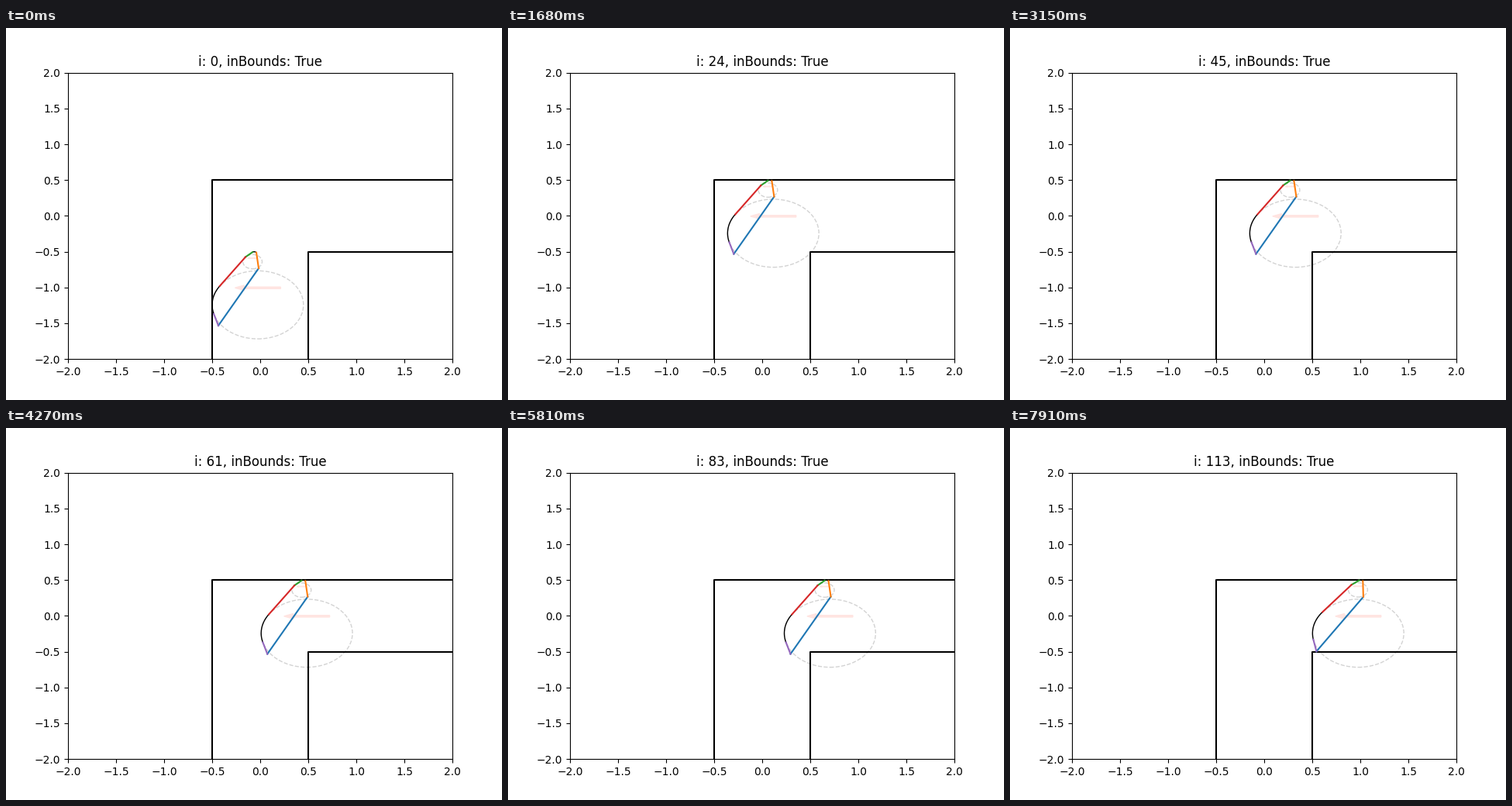
A matplotlib script that plays this animation: 640x480 px, repeating every 7980 ms.

```python
import numpy as np
import matplotlib.pyplot as plt
from matplotlib.animation import FuncAnimation
from matplotlib.patches import Circle, Polygon

FRAMES, STEP_MS = 114, 70
BIG_R, SMALL_R = 0.475, 0.1
LIFT_END, TURN_START, TURN_END, LAST = 10, 101, 108, 113

# Shape vertices, relative to the centre of the large circle
SMALL = np.array([-0.055, 0.6025])
FOOT = (-0.4105, -0.29)
ELBOW = (0.009, 0.5105)
CAP_R = (-0.015, 0.73)
CAP_L = (-0.055, 0.7355)
SHOULDER = (-0.128, 0.668)


def on_big(deg):
    a = np.radians(deg)
    return np.stack([BIG_R * np.cos(a), BIG_R * np.sin(a)], axis=-1)


def bezier(p, q, r, n=12):
    t = np.linspace(0, 1, n)[:, None]
    p, q, r = map(np.array, (p, q, r))
    return (1 - t) ** 2 * p + 2 * t * (1 - t) * q + t ** 2 * r


BACK, HEEL = on_big(146.4), on_big(195.5)
EDGES = [np.array(e) for e in (
    (FOOT, ELBOW), (ELBOW, CAP_R), (CAP_L, SHOULDER),
    (SHOULDER, BACK), (HEEL, FOOT))]
ARCS = [on_big(np.linspace(146.4, 195.5, 40)),
        bezier(CAP_L, (-0.035, 0.75), CAP_R)]

# Unit arrow pointing left, scaled by the radius of its circle
ARROW = np.array([(0.5, 0.55), (0.5, 0.45), (-0.3, 0.45 ), (-0.3, 0.35),
                  (-0.5, 0.5), (-0.3, 0.65), (-0.3, 0.55)])
ARROW[:, 1] = 0.5 + (ARROW[:, 1] - 0.5) * 0.5 * np.where(
    np.abs(ARROW[:, 1] - 0.5) > 0.1, 1.0, 1.0)


def pose(i):
    """Centre of the large circle and the turn angle in radians."""
    x = np.interp(i, [0, LIFT_END, TURN_START, TURN_END, LAST],
                  [-0.025, -0.025, 0.885, 0.915, 0.978])
    y = np.interp(i, [0, LIFT_END], [-1.2425, -0.2425])
    turn = np.interp(i, [TURN_START, TURN_END], [0, -5])
    return np.array([x, y]), np.radians(turn)


fig, ax = plt.subplots(figsize=(6.4, 4.8), dpi=100)
ax.set_xlim(-2, 2)
ax.set_ylim(-2, 2)
title = ax.set_title("")

ax.plot([-0.5, -0.5, 3], [-3, 0.5, 0.5], color="black")
ax.plot([0.5, 0.5, 3], [-3, -0.5, -0.5], color="black")

radii = (BIG_R, SMALL_R)
circles = [ax.add_patch(Circle((0, 0), r, fill=False, ls="--", lw=1,
                               ec="lightgray")) for r in radii]
arrows = [ax.add_patch(Polygon(ARROW * r, fc="mistyrose", ec="mistyrose",
                               lw=1)) for r in radii]
arcs = [ax.plot([], [], color="black", lw=1, zorder=1.5)[0] for _ in ARCS]
edges = [ax.plot([], [], color=f"C{k}")[0] for k in range(len(EDGES))]


def update(i):
    centre, turn = pose(i)
    c, s = np.cos(turn), np.sin(turn)
    rot = np.array([[c, s], [-s, c]])

    for line, pts in zip(edges + arcs, EDGES + ARCS):
        line.set_data(*(pts @ rot + centre).T)

    spots = (centre, centre + SMALL @ rot)
    for circle, arrow, spot, r in zip(circles, arrows, spots, radii):
        circle.set_center(spot)
        arrow.set_xy(ARROW * r + spot)

    title.set_text(f"i: {i}, inBounds: True")
    return [title, *circles, *arrows, *arcs, *edges]


anim = FuncAnimation(fig, update, frames=FRAMES, interval=STEP_MS,
                     repeat=True, repeat_delay=0)
plt.show()
```
